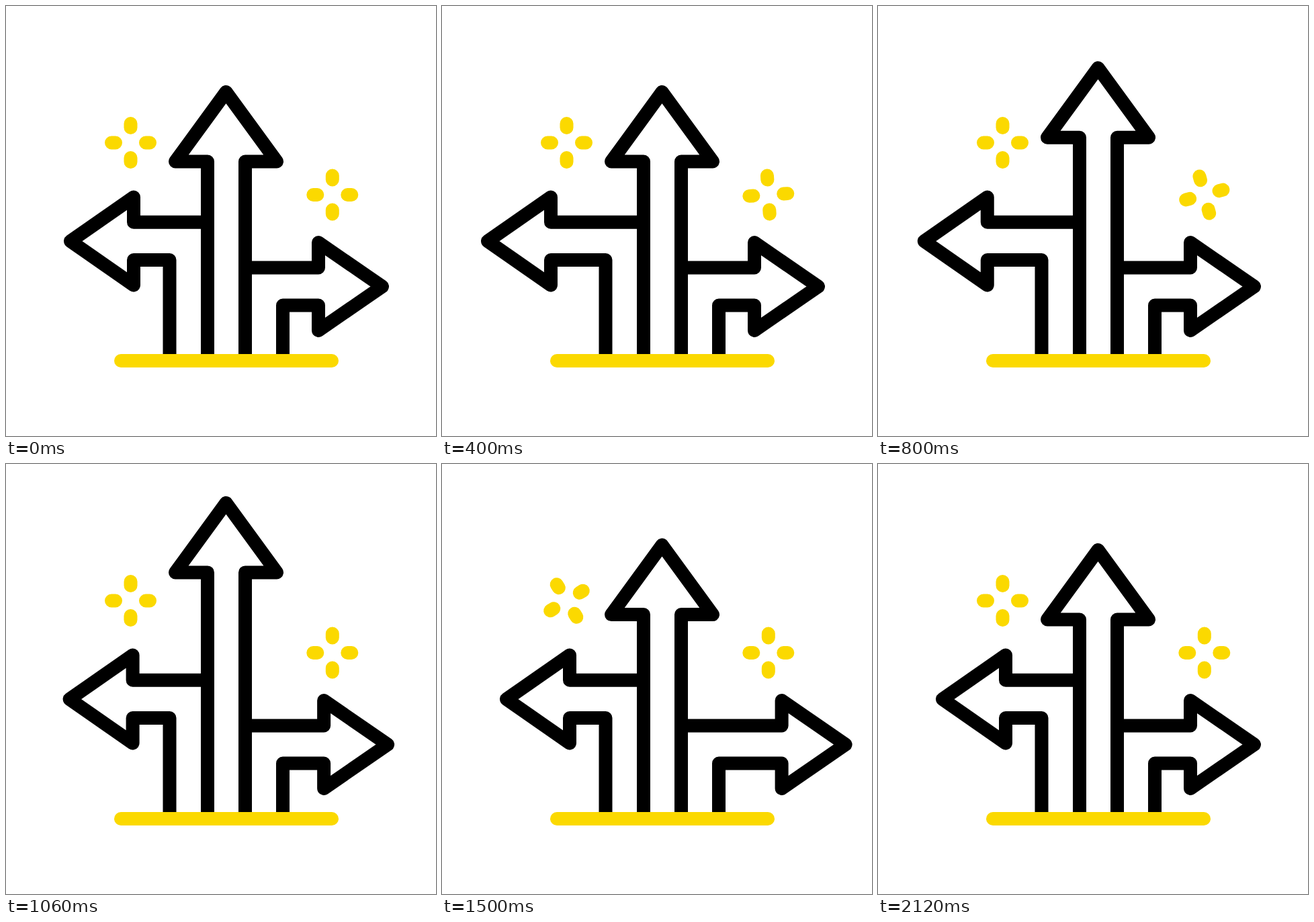
Animation of 640 by 640 pixels, one loop 2200 ms. Source, as an HTML page:

```html
<!DOCTYPE html>
<html lang="en">
<head>
<meta charset="utf-8">
<title>Branching arrows</title>
<style>
  html, body { margin: 0; width: 100%; height: 100%; overflow: hidden; background: #fff; }
  svg { display: block; width: 100vw; height: 100vh; }
  path { fill: none; stroke-width: 20; stroke-linejoin: round; }
  .arrow { stroke: #000; }
  .accent { stroke: #fbd900; stroke-linecap: round; }
</style>
</head>
<body>
<svg viewBox="0 0 640 640">
  <path class="arrow" id="left"/>
  <path class="arrow" id="right"/>
  <path class="arrow" id="up"/>
  <path class="accent" d="M171 528H485"/>
  <path class="accent" id="sparkA"/>
  <path class="accent" id="sparkB"/>
</svg>
<script>
const LOOP = 2200;
const MOVE = 580;   // one arrow stroke, out or back
const SPIN = 972;   // one full sparkle turn
const EASE = 0.64;  // symmetric bezier handle length

const el = id => document.getElementById(id);

// Uneven cadence: 40 ms steps, with some of 60 ms.
const longSteps = new Set([0, 220, 400, 660, 800, 1100, 1240, 1500, 1720, 1900]);
const steps = [];
for (let t = 0; t <= 2120; t += longSteps.has(t) ? 60 : 40) steps.push(t);

// cubic-bezier(EASE, 0, 1 - EASE, 1), solved by bisection
function ease(x) {
  if (x <= 0) return 0;
  if (x >= 1) return 1;
  const smooth = s => s * s * (3 - 2 * s);
  let lo = 0, hi = 1;
  for (let i = 0; i < 24; i++) {
    const s = (lo + hi) / 2;
    const px = smooth(s) + EASE * 3 * s * (1 - s) * (1 - 2 * s);
    if (px < x) lo = s; else hi = s;
  }
  return smooth((lo + hi) / 2);
}

const outAndBack = (t, start) =>
  ease((t - start) / MOVE) - ease((t - start - MOVE) / MOVE);

const spark = 'M0 -28.5V-22.5M0 22.5V28.5M-28.5 0H-22.5M22.5 0H28.5';
const sparks = [
  { node: el('sparkA'), x: 185.5, y: 203.5, start: 1045 },
  { node: el('sparkB'), x: 485.8, y: 281, start: 20 }
];
sparks.forEach(s => s.node.setAttribute('d', spark));

function draw(t) {
  const l = -33.2 * outAndBack(t, 15);
  const u = -70.2 * outAndBack(t, 508);
  const r = 41.2 * outAndBack(t, 848);

  el('left').setAttribute('d',
    `M300 321.7H${190 + l}V284.5L${96 + l} 350L${190 + l} 415.5V378H243.5V519`);
  el('up').setAttribute('d',
    `M300 519V${231.5 + u}H252L327.5 ${128 + u}L403 ${231.5 + u}H356V519`);
  el('right').setAttribute('d',
    `M356 389.5H${465 + r}V352L${560 + r} 417.5L${465 + r} 483V445.5H412V519`);

  for (const s of sparks) {
    const angle = 360 * ease((t - s.start) / SPIN);
    s.node.setAttribute('transform', `translate(${s.x} ${s.y}) rotate(${angle})`);
  }
}

const origin = performance.now();
function tick() {
  const t = (performance.now() - origin) % LOOP;
  draw(steps.filter(s => s <= t).pop());
  requestAnimationFrame(tick);
}
tick();
</script>
</body>
</html>
```
